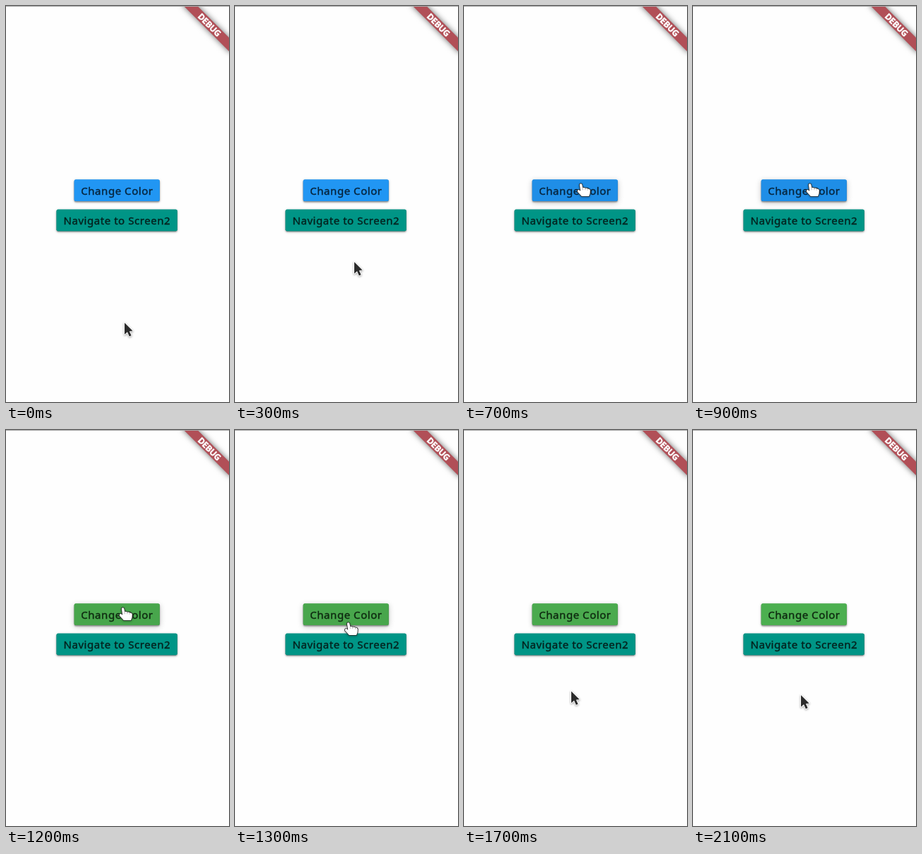
Recreate the animation shown at these times as an HTML page with a canvas. Size 316x560 px, loop 2.4 s.

```html
<!DOCTYPE html>
<html lang="en">
<head>
<meta charset="utf-8">
<title>Change Color</title>
<style>
html, body { margin: 0; width: 100%; height: 100%; overflow: hidden; background: #fefefe; }
canvas { display: block; width: 316px; height: 560px; }
</style>
</head>
<body>
<canvas id="stage"></canvas>
<script>
const W = 316, H = 560, LOOP = 2400, STEP = 100, LAST = 2100;
const FONT = '"Noto Sans", "Open Sans", sans-serif';
const canvas = document.getElementById('stage');
const ctx = canvas.getContext('2d');
const dpr = window.devicePixelRatio || 1;
canvas.width = W * dpr;
canvas.height = H * dpr;

const arrow = new Path2D('M0 0V16.5L4 13L6.8 19.2L9.6 18L6.8 11.9L11.6 11.4Z');
const hand = new Path2D(
  'M-1.2 .4Q.4-1.6 2.2 .2L3.2 5Q5.2 4.2 6.8 5.8Q8.8 5 10.4 6.6' +
  'Q13.2 6.2 13.8 8.8L13.5 13.2L12 17H1.8L-4 10.8Q-4.8 7.8-2 8L.2 9.8Z');

// Pointer path: time, x, y of the tip
const track = [
  [0, 168, 448], [100, 168, 439], [200, 168, 405], [300, 169, 362],
  [400, 170, 316], [500, 171, 278], [600, 168, 262], [700, 165, 252],
  [1200, 165, 252], [1300, 160, 273], [1400, 154, 315], [1500, 151.5, 346],
  [1600, 151, 364], [1800, 153, 375], [2400, 153, 375]
];

function pointerAt(t) {
  const i = Math.max(1, track.findIndex(p => p[0] >= t));
  const [t0, x0, y0] = track[i - 1], [t1, x1, y1] = track[i];
  const k = (t - t0) / (t1 - t0);
  return [x0 + (x1 - x0) * k, y0 + (y1 - y0) * k];
}

const clamp = v => Math.min(1, Math.max(0, v));
// Rises after a, falls away between b and c
const pulse = (t, a, b, c) => Math.min(clamp((t - a) / 200), clamp((c - t) / (c - b)));

function shadow(alpha, blur, dy) {
  ctx.shadowColor = `rgba(0,0,0,${alpha})`;
  ctx.shadowBlur = blur * dpr;
  ctx.shadowOffsetY = dy * dpr;
}

// Text with a thin outline for a medium weight
function label(text, x, y, font, color, spacing, weight) {
  ctx.font = `${font} ${FONT}`;
  ctx.letterSpacing = spacing + 'px';
  ctx.textAlign = 'center';
  ctx.fillStyle = ctx.strokeStyle = color;
  ctx.lineWidth = weight;
  ctx.lineJoin = 'round';
  ctx.fillText(text, x, y);
  ctx.strokeText(text, x, y);
}

function button(x, y, w, h, color, ink, text, hover) {
  const box = new Path2D();
  box.roundRect(x, y, w, h, 2);
  ctx.save();
  ctx.fillStyle = color;
  shadow(0.18 + 0.05 * hover, 4 + 5 * hover, 1 + hover);
  ctx.fill(box);
  shadow(0.4, 2, 1.3);
  ctx.fill(box);
  ctx.restore();
  ctx.fillStyle = `rgba(0,0,0,${0.05 * hover})`;
  ctx.fill(box);
  label(text, x + w / 2 + 0.2, y + 21, '400 15px', ink, 0.55, 0.4);
}

function banner() {
  ctx.save();
  ctx.translate(W, 0);
  ctx.rotate(Math.PI / 4);
  ctx.save();
  shadow(0.6, 8, 0);
  ctx.fillStyle = '#b14f57';
  ctx.fillRect(-48, 31.6, 96, 13.7);
  ctx.restore();
  label('DEBUG', -0.8, 42.8, '800 12px', '#fff', -0.2, 0.4);
  ctx.restore();
}

function pointer(t) {
  const [x, y] = pointerAt(t);
  const isHand = t >= 400 && t <= 1500;
  const shape = isHand ? hand : arrow;
  ctx.save();
  ctx.translate(x, y);
  ctx.lineJoin = 'round';
  shadow(0.4, 3, 1);
  ctx.lineWidth = isHand ? 1.6 : 1.8;
  ctx.strokeStyle = isHand ? '#222' : '#fff';
  ctx.stroke(shape);
  ctx.shadowColor = 'transparent';
  ctx.fillStyle = isHand ? '#fff' : '#2b2b2b';
  ctx.fill(shape);
  if (isHand) {
    ctx.lineWidth = 0.7;
    ctx.strokeStyle = '#999';
    ctx.stroke(new Path2D('M3.2 5V8.2M6.8 6V8.2M10.4 6.8V8.7'));
  }
  ctx.restore();
}

function draw(t) {
  ctx.setTransform(dpr, 0, 0, dpr, 0, 0);
  ctx.fillStyle = '#fefefe';
  ctx.fillRect(0, 0, W, H);
  const [color, ink] = t < 1000 ? ['#2196f3', '#07263f'] : ['#4caf50', '#0f2b11'];
  button(96.7, 245.6, 121, 30.5, color, ink, 'Change Color', pulse(t, 500, 1500, 2000));
  button(71.6, 287.8, 171, 30.5, '#009586', '#04231f', 'Navigate to Screen2', 0);
  banner();
  ctx.fillStyle = '#a8a8a8';
  ctx.fillRect(0, 0, W, 1);
  pointer(t);
}

const start = performance.now();
function tick() {
  const t = (performance.now() - start) % LOOP;
  draw(Math.min(LAST, Math.floor(t / STEP) * STEP));
  requestAnimationFrame(tick);
}
tick();
</script>
</body>
</html>
```
